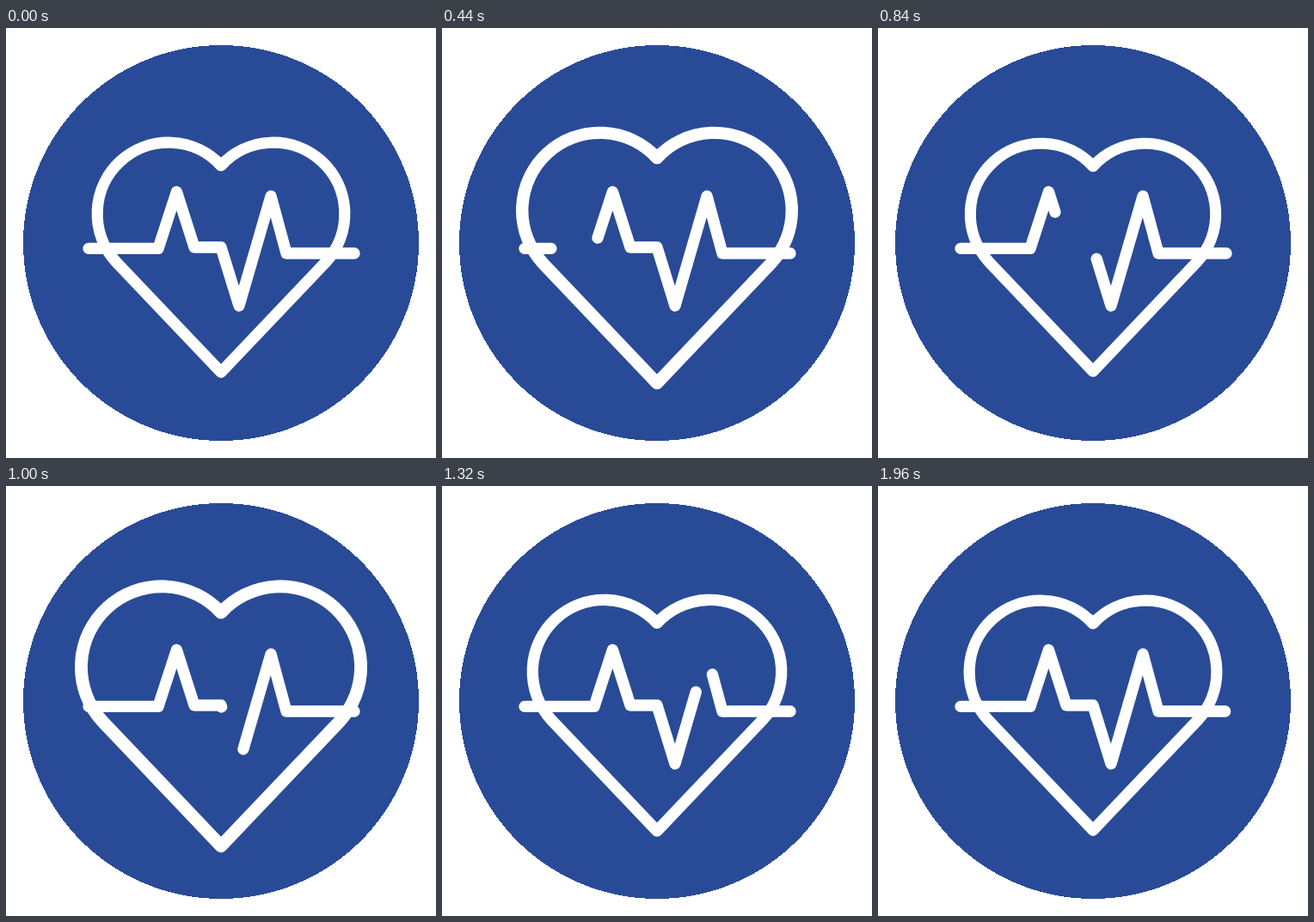
Write an HTML page that moves like this. It is 500 px wide and 500 px high and loops after 2000 ms.

```html
<!DOCTYPE html>
<html lang="en">
<head>
<meta charset="utf-8">
<title>Heartbeat</title>
<style>
  html, body { margin: 0; width: 100%; height: 100%; overflow: hidden; background: #fff; }
  svg { display: block; width: 100vw; height: 100vh; }
  path, polyline { fill: none; stroke: #fff; stroke-linecap: round; stroke-linejoin: round; }
</style>
</head>
<body>
<svg viewBox="0 0 500 500">
  <circle cx="250" cy="250" r="230" fill="#294b97" shape-rendering="crispEdges"/>
  <path id="heart" stroke-width="13.2"
    d="M250 400.3 L128 272 A82 82 0 1 1 250 160 A82 82 0 1 1 372 272 Z"/>
  <polyline id="pulse" stroke-width="13.3"
    points="96,256.4 177,256.4 198.4,190.5 219,255 250,255 271,323 308,195.5 326,262 405,262"/>
</svg>
<script>
  const LOOP = 2000, STEP = 40, CENTER_Y = 259;
  const heart = document.getElementById('heart');
  const pulse = document.getElementById('pulse');
  const total = pulse.getTotalLength();

  // Two beats: squeeze, swell, squeeze, bigger swell, rest
  const beat = [
    { at: 0, scale: 1 },
    { at: 260, scale: .9 },
    { at: 440, scale: 1.09 },
    { at: 740, scale: .94 },
    { at: 1040, scale: 1.14 },
    { at: 1360, scale: 1 }
  ];

  // Eased progress from 0 to 1 between two times
  function ease(t, from, to) {
    const u = Math.min(1, Math.max(0, (t - from) / (to - from)));
    return u * u * (3 - 2 * u);
  }

  function heartScale(t) {
    const i = beat.findIndex(key => key.at > t);
    if (i < 0) return beat[beat.length - 1].scale;
    const a = beat[i - 1], b = beat[i];
    return a.scale + (b.scale - a.scale) * ease(t, a.at, b.at);
  }

  function draw(t) {
    heart.setAttribute('transform',
      `translate(250 ${CENTER_Y}) scale(${heartScale(t)}) translate(-250 ${-CENTER_Y})`);

    // A gap runs along the line; its tail starts later than its head
    const head = total * ease(t, -40, 1880);
    const tail = total * ease(t, 190, 2010);
    const gap = head - tail;
    pulse.setAttribute('stroke-dasharray', gap > 1 ? `${tail} ${gap} ${total} ${total}` : 'none');
  }

  const start = performance.now();
  function tick() {
    const t = (performance.now() - start) % LOOP;
    draw(Math.floor(t / STEP) * STEP);
    requestAnimationFrame(tick);
  }
  tick();
</script>
</body>
</html>
```
